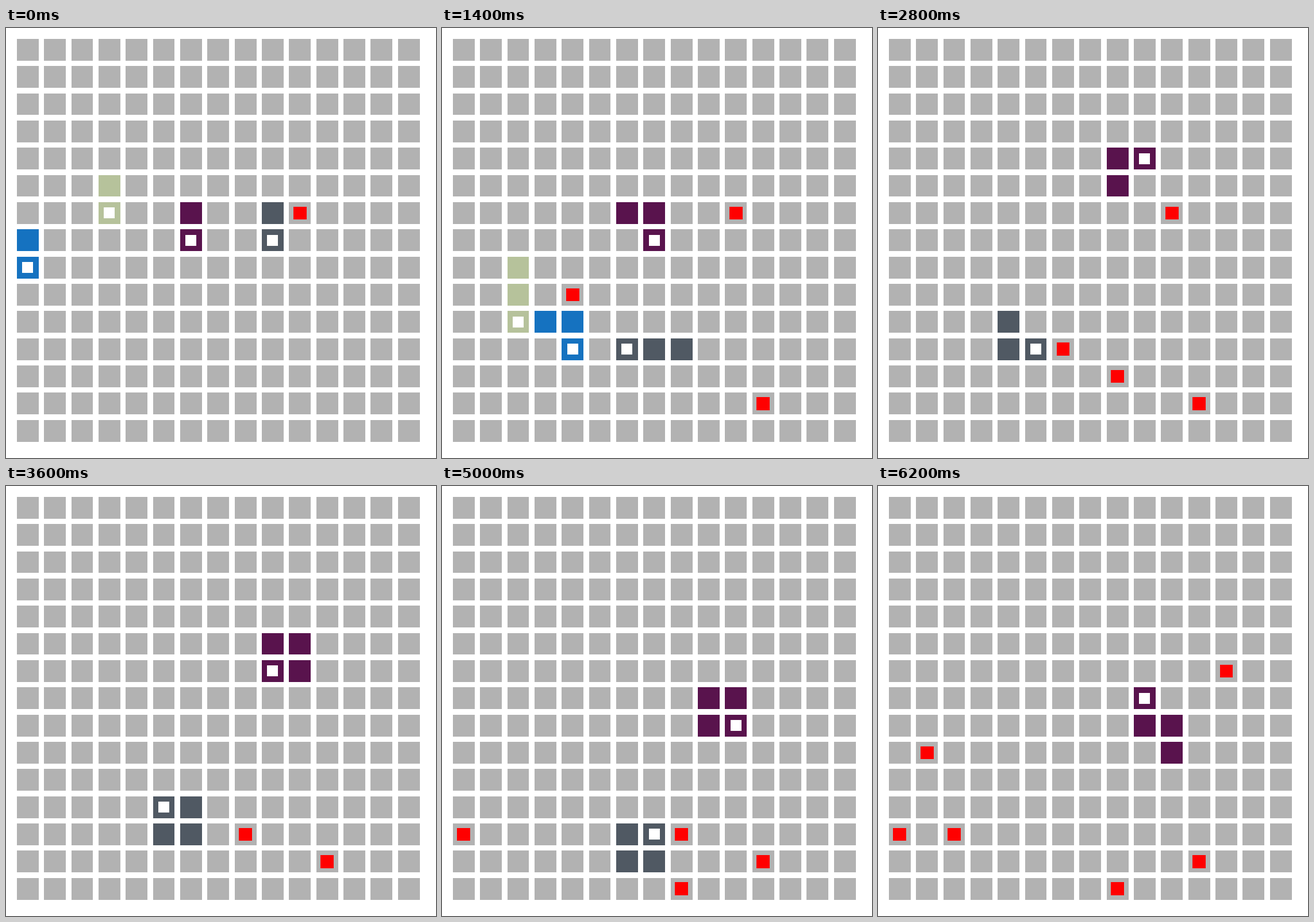
Recreate the animation shown at these times as an HTML page. Size 748 by 748 pixels, loop 6400 ms.

```html
<!DOCTYPE html>
<html lang="en">
<head>
<meta charset="utf-8">
<title>Snakes</title>
<style>
html, body { margin: 0; width: 100%; height: 100%; overflow: hidden; background: #fff; }
svg { display: block; width: 100%; height: 100%; }
</style>
</head>
<body>
<svg viewBox="0 0 748 748" xmlns="http://www.w3.org/2000/svg">
  <g id="grid"></g>
  <g id="play"></g>
</svg>
<script>
const SIZE = 15, TICK = 200, TICKS = 32;
const UNIT = 748 / (SIZE * 5 + 4);
const STEP = { U: [0, -1], D: [0, 1], L: [-1, 0], R: [1, 0] };

// A snake vanishes when its moves run out; it grows one tick after a meal.
const snakes = [
  { color: '#b6c29b', start: [3, 5], moves: 'DLLDRDDD', meals: [] },
  { color: '#1572c0', start: [0, 7], moves: 'DRRDRDRDLURU', meals: [11] },
  { color: '#505963', start: [9, 6], moves: 'DDDDLDLLUULDLDRRDLUURDDDRURUUUU', meals: [15, 26] },
  { color: '#59134d', start: [6, 6], moves: 'DRUULDRDLURURURDRDLDRDLURDLDRULU', meals: [17] }
];

// column, row, first tick, tick when eaten
const foods = [
  [10, 6, 0, 17], [4, 9, 2, 11], [11, 13, 3, TICKS], [8, 12, 8, 26],
  [6, 11, 13, 15], [0, 12, 20, TICKS], [8, 14, 21, TICKS],
  [2, 12, 26, TICKS], [1, 9, 27, TICKS], [12, 6, 26, TICKS]
];

for (const s of snakes) {
  s.path = [s.start];
  for (const m of s.moves) {
    const [x, y] = s.path[s.path.length - 1];
    s.path.push([x + STEP[m][0], y + STEP[m][1]]);
  }
}

// Edges are snapped to whole pixels.
const snap = v => Math.round(v * UNIT - 0.02);

function square(col, row, inset, color) {
  const span = i => {
    const a = snap(2 + 5 * i + inset);
    return [a, snap(6 + 5 * i - inset) - a];
  };
  const [x, w] = span(col), [y, h] = span(row);
  return `<rect x="${x}" y="${y}" width="${w}" height="${h}" fill="${color}"/>`;
}

function drawGrid() {
  let out = '';
  for (let row = 0; row < SIZE; row++)
    for (let col = 0; col < SIZE; col++) out += square(col, row, 0, '#b2b2b2');
  return out;
}

function drawTick(tick) {
  let out = '';
  for (const [col, row, from, to] of foods)
    if (tick >= from && tick < to) out += square(col, row, 0.8, '#f00');
  for (const s of snakes) {
    if (tick >= s.moves.length) continue;
    const length = 3 + s.meals.filter(m => m < tick).length;
    const head = tick + 1;
    const body = s.path.slice(Math.max(0, head - length + 1), head + 1);
    for (const [col, row] of body) out += square(col, row, 0, s.color);
    out += square(...s.path[head], 1, '#fff');
  }
  return out;
}

const play = document.getElementById('play');
document.getElementById('grid').innerHTML = drawGrid();

let shown = -1;
function render(time) {
  const tick = Math.floor(time / TICK) % TICKS;
  if (tick === shown) return;
  shown = tick;
  play.innerHTML = drawTick(tick);
}

render(0);
const begin = performance.now();
function loop() {
  render(performance.now() - begin);
  requestAnimationFrame(loop);
}
requestAnimationFrame(loop);
</script>
</body>
</html>
```
